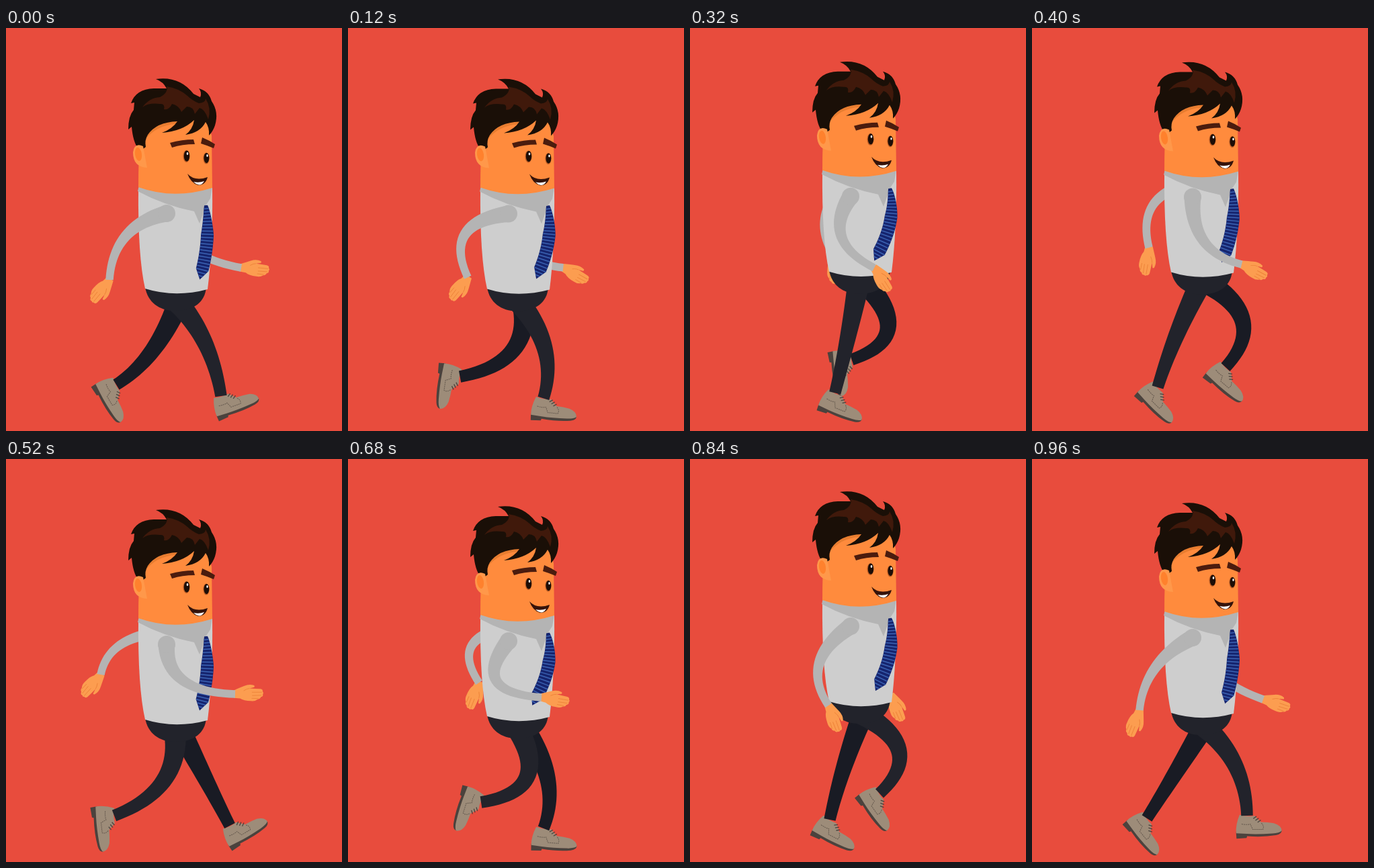
Write an HTML page with a canvas that moves like this. It is 500x600 px and loops after 1 s.

```html
<!DOCTYPE html>
<html lang="en">
<head>
<meta charset="utf-8">
<title>Walk cycle</title>
<style>
html, body { margin: 0; width: 100%; height: 100%; overflow: hidden; background: #e84c3d; }
canvas { display: block; }
</style>
</head>
<body>
<canvas id="stage" width="500" height="600"></canvas>
<script>
const ctx = document.getElementById('stage').getContext('2d');
const LOOP = 1000, STEP = 40;
const RED = '#e84c3d', SKIN = '#ff8b3d', HAND = '#fc9d50', SHIRT = '#cecece', SLEEVE = '#b4b4b4';
const HAIR = '#1a0f07', BROWN = '#40190b', NEAR = '#22232b', FAR = '#191b24';

// time, ankle x, ankle y, foot angle, knee x, knee y
const nearLeg = [
  [0, 320, 548, -24, 306, 460], [100, 297, 551, 0, 316, 474], [240, 246, 551, 1, 282, 473],
  [400, 187, 535, 41, 210, 460], [460, 168, 532, 58, 232, 484], [520, 161, 531, 80, 262, 492],
  [600, 171, 523, 98, 290, 496], [680, 198, 511, 104, 307, 494], [840, 282, 498, 51, 355, 430],
  [960, 320, 531, -4, 318, 447]
];
const farLeg = [
  [0, 164, 531, 56, 224, 494], [80, 163, 526, 84, 264, 496], [240, 196, 494, 104, 307, 497],
  [400, 288, 505, 37, 354, 433], [520, 333, 546, -34, 297, 476], [600, 319, 550, -4, 316, 474],
  [680, 291, 550, 1, 319, 478], [840, 208, 537, 23, 224, 464], [960, 171, 535, 47, 215, 466]
];
// time, wrist x, wrist y, hand angle, elbow x, elbow y
const nearArm = [
  [0, 154, 375, 126, 159, 295], [240, 233, 363, 84, 150, 301], [400, 312, 352, 24, 236, 333],
  [520, 341, 350, -4, 238, 347], [680, 288, 355, 6, 178, 347], [840, 206, 367, 66, 162, 301],
  [960, 160, 374, 108, 167, 302]
];
const farArm = [
  [0, 350, 357, 2, 245, 338], [240, 258, 352, 75, 205, 320], [400, 174, 327, 96, 155, 250],
  [520, 141, 321, 128, 152, 265], [680, 195, 333, 108, 152, 268], [840, 299, 352, 64, 235, 330],
  [960, 344, 358, 15, 245, 322]
];
const bob = [[0, 0], [20, 0], [110, 1], [180, -5], [240, -13], [340, -27], [365, -28], [400, -24.5], [460, -10]];

// Smooth periodic interpolation through unevenly spaced keys
function sample(keys, time, period) {
  const n = keys.length, t = time % period;
  const key = i => {
    const lap = Math.floor(i / n), k = keys[i - lap * n];
    return [k[0] + lap * period, ...k.slice(1)];
  };
  let i = n - 1;
  while (keys[i][0] > t) i--;
  const [a, b, c, d] = [key(i - 1), key(i), key(i + 1), key(i + 2)];
  const h0 = b[0] - a[0], h = c[0] - b[0], h1 = d[0] - c[0], u = (t - b[0]) / h;
  return b.slice(1).map((v, j) => {
    const k = j + 1, s0 = (v - a[k]) / h0, s = (c[k] - v) / h, s1 = (d[k] - c[k]) / h1;
    const m0 = (s0 * h + s * h0) / (h0 + h) * h, m1 = (s * h1 + s1 * h) / (h + h1) * h;
    const e = c[k] - v;
    return v + u * (m0 + u * (3 * e - 2 * m0 - m1 + u * (m0 + m1 - 2 * e)));
  });
}

function shape(color, d) {
  ctx.fillStyle = color;
  ctx.fill(new Path2D(d));
}
function line(color, width, d) {
  ctx.strokeStyle = color;
  ctx.lineWidth = width;
  ctx.stroke(new Path2D(d));
}
function oval(color, x, y, rx, ry, turn = 0) {
  ctx.fillStyle = color;
  ctx.beginPath();
  ctx.ellipse(x, y, rx, ry, turn, 0, 7);
  ctx.fill();
}
function placed(x, y, deg, draw) {
  ctx.save();
  ctx.translate(x, y);
  ctx.rotate(deg * Math.PI / 180);
  draw();
  ctx.restore();
}

// Point and unit direction on a quadratic curve
function curve(p, c, q, u) {
  const v = 1 - u;
  const x = v * v * p[0] + 2 * u * v * c[0] + u * u * q[0];
  const y = v * v * p[1] + 2 * u * v * c[1] + u * u * q[1];
  const dx = v * (c[0] - p[0]) + u * (q[0] - c[0]), dy = v * (c[1] - p[1]) + u * (q[1] - c[1]);
  const len = Math.hypot(dx, dy) || 1;
  return { x, y, dx: dx / len, dy: dy / len };
}
function ribbon(color, p, c, q, width, tip = 0) {
  const left = [], right = [];
  for (let i = 0; i <= 24; i++) {
    const u = i / 24, o = curve(p, c, q, u), w = width(u) / 2;
    left.push([o.x - o.dy * w, o.y + o.dx * w]);
    right.unshift([o.x + o.dy * w, o.y - o.dx * w]);
  }
  const end = curve(p, c, q, 1);
  if (tip) left.push([end.x + end.dx * tip, end.y + end.dy * tip]);
  ctx.fillStyle = color;
  ctx.beginPath();
  left.concat(right).forEach(pt => ctx.lineTo(...pt));
  ctx.fill();
}
const taper = (a, b, power) => u => b + (a - b) * (1 - u) ** power;

function shoe() {
  shape('#4b423d', 'M-18 23L-18 33L-3 33L-2 30.5Q22 34 41 32Q50 31 50 25Z');
  shape('#9d8c79', 'M-11 -2Q0 2 11 1L20 11Q30 12 39 14Q50 18 50 26Q46 29 36 29Q14 29 -2 27L-18 25Q-18 12 -11 -2Z');
  ctx.setLineDash([2, 1]);
  line('#65594e', 1, 'M-9 12Q-1 14 4 13L7 21L22 22Q25 17 20 12');
  ctx.setLineDash([]);
  line('#4b423d', 1.3, 'M9 5L14 2M12 8L17 5M15 11L20 8');
}

function leg(keys, hip, color, t) {
  const [x, y, turn, kx, ky] = sample(keys, t, LOOP);
  placed(x, y, turn, shoe);
  ribbon(color, hip, [kx, ky], [x, y], taper(33, 17.5, 1.3));
}

function hand() {
  shape(HAND, 'M-2 -5.5Q8 -9 14 -11Q22 -14 29 -11Q31 -8 27 -8L22 -7Q31 -6 38 -5Q42 -4 41 -1Q43 1 41 3Q42 6 38 7Q37 10 33 10Q29 13 23 12Q12 11 7 7L-2 5.5Z');
  line('#ec8339', 0.9, 'M25 -1L40 0M25 4L39 4.5M24 8L34 9M13 -4Q18 -7 22 -7');
}

function arm(keys, shoulder, t, power, start) {
  const [x, y, turn, ex, ey] = sample(keys, t, LOOP);
  placed(x, y, turn, hand);
  ribbon(SLEEVE, shoulder, [ex, ey], [x, y], taper(start, 11.5, power));
}

function torso() {
  shape(NEAR, 'M207 386C211 408 227 421 252 421C280 421 296 408 298 386Z');
  shape(SHIRT, 'M197 238Q196 340 207 388Q252 402 300 389Q308 325 307 238Z');
  shape(SLEEVE, 'M198 235Q250 254 307 236L304 254L298 263L288 291L280 273Q235 264 196 243Z');
}

function head() {
  shape(SKIN, 'M205 130Q197 160 197 237Q250 256 307 238L306 160L295 125Z');
  shape('#e87d30', 'M207 166Q216 144 258 134L252 143Q224 145 207 166Z');
  shape(HAIR, `M208 177Q203 182 197 180Q189 170 187 147L182 151Q182 131 190 122L191 111L186 112
    Q193 91 220 90L239 90Q234 80 223 76Q258 71 279 98L289 103Q292 96 287 90Q302 94 306 109
    Q317 125 311 145Q308 154 302 160Q303 148 297 140Q289 156 267 159Q278 151 280 137
    Q262 154 232 156Q248 150 255 139Q224 140 211 159Q206 167 208 177Z`);
  shape(BROWN, `M203 118Q213 104 229 103Q242 96 239 87Q258 90 270 101Q277 108 287 112Q297 111 297 105
    Q306 119 301 136Q296 121 288 119L281 128Q279 117 269 117L261 125Q257 115 247 113
    Q242 123 235 121Q237 112 229 113Q212 111 203 118Z`);
  shape('#ff984a', 'M204 176Q191 170 189 185Q189 207 210 208Z');
  oval('#ff812d', 197, 188, 5, 10, -0.15);

  oval('#b95b24', 268.5, 191, 5, 9);
  oval('#1d0d06', 269, 190.5, 4.2, 8);
  oval('#b95b24', 298, 194, 4.6, 8.6);
  oval('#1d0d06', 298.4, 193.5, 3.9, 7.6);
  oval('#fff', 270, 187, 1.3, 2);
  oval('#fff', 299.5, 190, 1.2, 1.9);
  shape('#4b1c0e', 'M244 171Q262 166 279 166L281 173Q262 173 247 178ZM292 163Q302 167 311 173L309 179Q300 175 290 172Z');
  shape('#35130a', 'M270 217Q281 229 300 222Q297 234 286 234Q275 231 270 217Z');
  shape('#fff', 'M279 229Q287 231 295 228Q292 233.500 287 233.500Q283 233 279 229Z');
}

function tie(t, b) {
  const sway = 17 * Math.sin(Math.PI * t / 500) ** 2;
  const p = [297.5, 264 + b], c = [304 + sway * 0.25, 312 + b - sway * 0.15], q = [292 - sway * 0.77, 360 + b - sway * 0.1];
  const width = u => 5 + 14 * Math.min(1, u * 2.2) ** 0.8;
  ribbon('#16256f', p, c, q, width, 15);
  for (let i = 1; i < 21; i++) {
    const u = i / 20, o = curve(p, c, q, u), w = width(u) / 2 - 0.3;
    line('#3c64b4', 1.5, `M${o.x - o.dy * w} ${o.y + o.dx * w}L${o.x + o.dy * w} ${o.y - o.dx * w}`);
  }
  const e = curve(p, c, q, 1);
  for (let i = 1; i < 3; i++) {
    const x = e.x + e.dx * i * 4.8, y = e.y + e.dy * i * 4.8, w = 9.2 * (1 - i * 0.32);
    line('#3c64b4', 1.5, `M${x - e.dy * w} ${y + e.dx * w}L${x + e.dy * w} ${y - e.dx * w}`);
  }
}

function raised(b, draw) {
  ctx.save();
  ctx.translate(0, b);
  draw();
  ctx.restore();
}

function draw(t) {
  const b = sample(bob, t, 500)[0];
  ctx.fillStyle = RED;
  ctx.fillRect(0, 0, 500, 600);
  arm(farArm, [232, 258 + b], t, 2, 18);
  leg(farLeg, [259, 403 + b], FAR, t);
  leg(nearLeg, [251, 404 + b], NEAR, t);
  raised(b, () => { torso(); head(); });
  tie(t, b);
  arm(nearArm, [239, 276 + b], t, 1.8, 25);
  oval(SLEEVE, 239, 276 + b, 13, 13);
}

function tick(now) {
  draw(Math.floor(now % LOOP / STEP) * STEP);
  requestAnimationFrame(tick);
}
draw(0);
requestAnimationFrame(tick);
</script>
</body>
</html>
```
